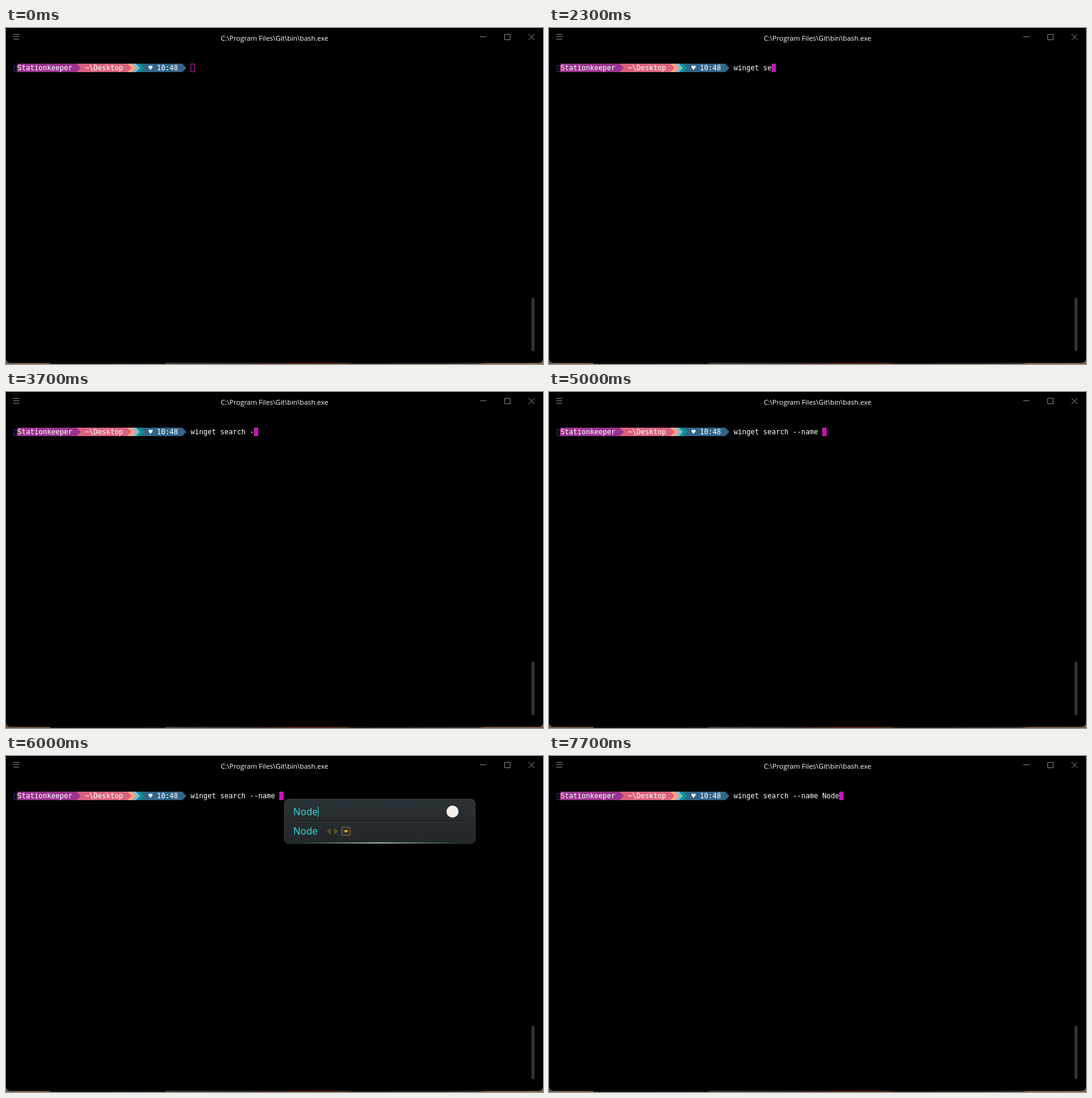
Recreate the animation shown at these times as an HTML page. Size 890 px wide and 556 px high, loop 8 s.

```html
<!DOCTYPE html>
<html lang="en">
<head>
<meta charset="utf-8">
<title>Terminal</title>
<style>
html, body { margin: 0; width: 100%; height: 100%; overflow: hidden; background: #000; }
svg { display: block; width: 890px; height: 556px; }
text { white-space: pre; fill: #fff; }
.mono { font: 11.63px "DejaVu Sans Mono", monospace; }
.title { font: 11.4px "Open Sans", sans-serif; text-anchor: middle; }
.ime { font: 16px "Open Sans", sans-serif; fill: #30e2e2; }
.icon { fill: none; stroke: #858585; }
</style>
</head>
<body>
<svg viewBox="0 0 890 556">
  <defs>
    <linearGradient id="desk">
      <stop offset="0" stop-color="#6b5548"/>
      <stop offset=".082" stop-color="#66503f"/>
      <stop offset=".083" stop-color="#14110f"/>
      <stop offset=".294" stop-color="#1a1512"/>
      <stop offset=".3" stop-color="#46403c"/>
      <stop offset=".46" stop-color="#352c2a"/>
      <stop offset=".56" stop-color="#5a241a"/>
      <stop offset=".63" stop-color="#54301f"/>
      <stop offset=".65" stop-color="#1a1614"/>
      <stop offset=".88" stop-color="#333029"/>
      <stop offset=".89" stop-color="#6f5444"/>
      <stop offset="1" stop-color="#7a5a48"/>
    </linearGradient>
    <linearGradient id="panel" x2="0" y2="1">
      <stop offset="0" stop-color="#2c3338"/>
      <stop offset=".5" stop-color="#262c2f"/>
      <stop offset="1" stop-color="#222728"/>
    </linearGradient>
    <linearGradient id="shine">
      <stop offset="0" stop-color="#9fd6cf" stop-opacity="0"/>
      <stop offset=".5" stop-color="#c8eee6"/>
      <stop offset="1" stop-color="#9fd6cf" stop-opacity="0"/>
    </linearGradient>
  </defs>

  <rect y="540" width="890" height="16" fill="url(#desk)"/>
  <rect y="-10" width="890" height="564" rx="7"/>

  <path class="icon" d="M12 10.5h10M12 14.5h10M12 18.5h10M786 14.5h10M826.5 10.5h9v9h-9zM866 10l10 10M876 10l-10 10"/>
  <text class="title" x="445" y="21">C:\Program Files\Git\bin\bash.exe</text>
  <rect x="871" y="446" width="5" height="89" rx="2.5" fill="#333"/>

  <path d="M18 62.5H13.5V72.5H18" fill="none" stroke="#3b2b9c"/>
  <path d="M18.5 62V73" stroke="#a02c58"/>
  <g id="prompt"></g>
  <g class="mono">
    <text x="19" y="70">Stationkeeper</text>
    <text x="131" y="70">~\Desktop</text>
    <text x="236" y="70">♥</text>
    <text x="250" y="70">10:48</text>
    <text id="line" x="306" y="70"></text>
  </g>
  <rect id="cursor" y="59.5" width="6" height="13" stroke="#c616b7"/>

  <g id="popup">
    <rect id="box" x="461.5" y="71.5" height="73" rx="7" fill="url(#panel)" stroke="#3b4346"/>
    <rect id="glow" x="490" y="143" height="1.4" fill="url(#shine)"/>
    <rect class="rule" x="476" y="107" height="1" fill="#0e1112"/>
    <rect class="rule" x="476" y="108" height="1" fill="#394145"/>
    <text id="input" class="ime" x="476" y="98"></text>
    <rect id="caret" y="84" width="1" height="17" fill="#30e2e2"/>
    <text id="pick" class="ime" x="476" y="130"></text>
    <g id="pager">
      <path d="M6 119v11l-6-5.500zM12 119v11l6-5.500z" fill="#5d5529"/>
      <rect x="24.500" y="117.500" width="14" height="14" rx="1" fill="#37342b" stroke="#7b6a41"/>
      <path d="M27.500 123h8l-4 4z" fill="#f0b840"/>
    </g>
    <circle id="badge" cy="92" r="10" fill="#f4f0ec"/>
  </g>
</svg>
<script>
const LOOP = 8000, CELL = 7;
const KEYS = "winget search --name n\bNode";
const KEY_TIMES = [800, 1100, 1200, 1300, 1400, 1500, 1700, 2100, 2300, 2500, 2600,
  2800, 2900, 3100, 3700, 3800, 4000, 4100, 4200, 4300, 5000,
  6400, 7000, 7300, 7500, 7600, 7700];
const IME_TIMES = [5600, 5800, 5900, 6000], IME_END = 6300;

const $ = id => document.getElementById(id);
const set = (el, attrs) => Object.entries(attrs).forEach(([k, v]) => el.setAttribute(k, v));
const passed = (times, t) => times.filter(x => x <= t).length;

// Powerline segments: later ones lie beneath the arrow of the one before.
const SEGMENTS = [[19, 117, "#9a348e"], [117, 201, "#da627d"], [201, 208, "#fca17d"],
  [208, 215, "#86bbd8"], [215, 222, "#06969a"], [222, 292, "#33658a"]];
$("prompt").innerHTML = SEGMENTS.reverse().map(([a, b, color]) =>
  `<path d="M${a} 59H${b}l7 7l-7 7H${a}z" fill="${color}"/>`).join("");

function drawPopup(t) {
  const count = passed(IME_TIMES, t);
  const open = count > 0 && t < IME_END;
  $("popup").style.display = open ? "" : "none";
  if (!open) return;
  const word = "Node".slice(0, count);
  const width = count > 1 ? 317 : 280;
  $("input").textContent = $("pick").textContent = word;
  const end = 476 + $("input").getComputedTextLength();
  set($("box"), { width: width - 1 });
  set($("glow"), { width: width - 60 });
  document.querySelectorAll(".rule").forEach(r => set(r, { width: width - 30 }));
  set($("caret"), { x: Math.round(end) });
  set($("pager"), { transform: `translate(${Math.round(end) + 15} 0)` });
  set($("badge"), { cx: 461 + width - 38 });
}

function draw(t) {
  let line = "";
  for (const key of KEYS.slice(0, passed(KEY_TIMES, t)))
    line = key === "\b" ? line.slice(0, -1) : line + key;
  $("line").textContent = line;
  set($("cursor"), { x: 306.5 + CELL * line.length, fill: t < 200 ? "none" : "#c616b7" });
  drawPopup(t);
}

const start = performance.now();
function frame() {
  draw((performance.now() - start) % LOOP);
  requestAnimationFrame(frame);
}
frame();
</script>
</body>
</html>
```
